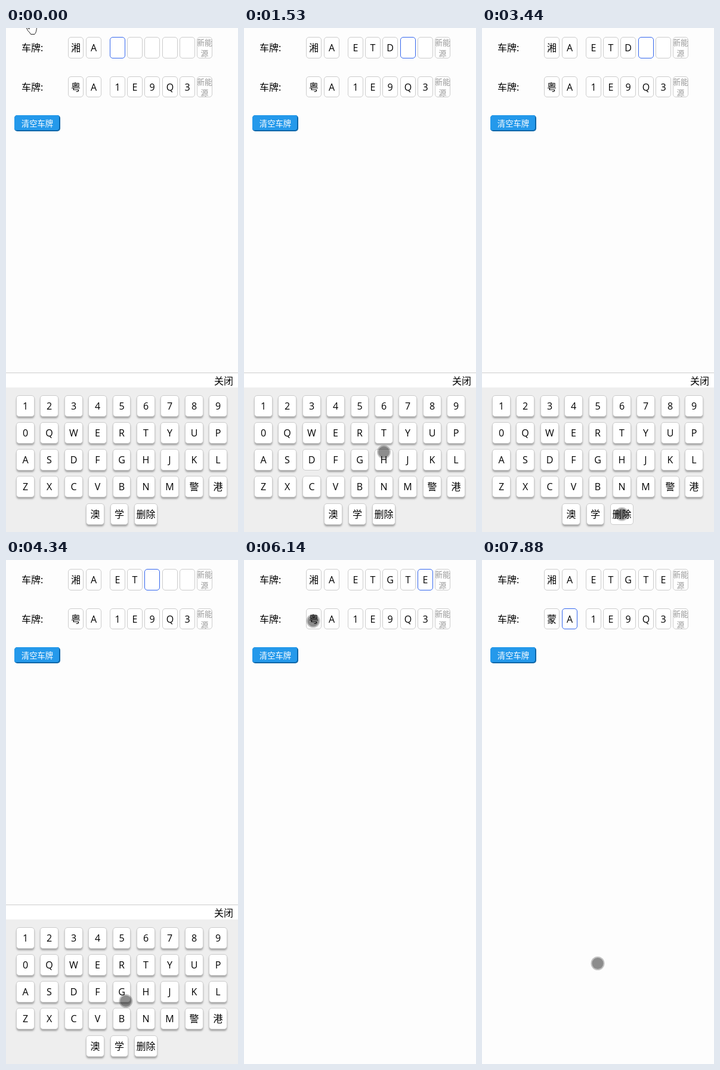
An HTML page with a canvas that plays this animation: 389x844 px, repeating every 8000 ms.

```html
<!DOCTYPE html>
<html lang="zh-CN">
<head>
<meta charset="utf-8">
<title>车牌键盘</title>
<style>
  html, body { margin: 0; width: 100%; height: 100%; overflow: hidden; background: #fdfdfd; }
  canvas { display: block; width: 389px; height: 844px; }
</style>
</head>
<body>
<canvas></canvas>
<script>
const W = 389, H = 844, LOOP = 8000;
const FONT = '"Open Sans", "Noto Sans CJK SC", "Noto Sans CJK", sans-serif';
const TRAVEL = 720, PRESS = 135, OPEN_DELAY = 210, SLIDE = 135;
const ROW_Y = [15, 81], LAST_CELL = 6;

const canvas = document.querySelector('canvas');
const ctx = canvas.getContext('2d');
const ratio = window.devicePixelRatio || 1;
canvas.width = W * ratio;
canvas.height = H * ratio;

const cellX = i => Math.round(i < 2 ? 104 + 30 * i : 174 + 29.2 * (i - 2));

// Lays out rows of keys; the last row has its own left edge.
function makeBoard(top, step, h, lastLeft, rows) {
  const keys = rows.flatMap((row, r) => row.split(' ').map((label, i) => {
    const left = (r === rows.length - 1 ? lastLeft : 17) + 40.4 * i;
    const x = Math.round(left);
    const w = Math.round(left + (label.length > 1 ? 39 : 30.8)) - x;
    return { label, x, y: Math.round(top + 38 + step * r), w, h };
  }));
  return { top, keys };
}
const LETTERS = makeBoard(577, 45.15, 36, 134.2, [
  '1 2 3 4 5 6 7 8 9', '0 Q W E R T Y U P', 'A S D F G H J K L', 'Z X C V B N M 警 港', '澳 学 删除'
]);
const PROVINCES = makeBoard(609, 48.4, 39, 118, [
  '京 津 沪 渝 蒙 新 藏 宁 桂', '黑 吉 辽 晋 冀 青 鲁 豫 苏', '皖 浙 闽 赣 湘 鄂 粤 琼 甘', '陕 贵 云 川'
]);

// The pointer reaches each stop at `arrive` and presses it at `tap`.
const STOPS = [
  { key: 'E', arrive: 720, tap: 900 },
  { key: 'T', arrive: 1080, tap: 1170 },
  { key: 'D', arrive: 1350, tap: 1440 },
  { key: 'H', arrive: 1530, tap: 1710, dy: -13 },
  { key: '港', arrive: 2340, dy: 20 },
  { key: '删除', arrive: 3150, tap: 3350 },
  { key: '删除', arrive: 3900, tap: 3980 },
  { key: 'G', arrive: 4560, tap: 4610 },
  { key: 'T', arrive: 4880, tap: 4970 },
  { key: 'E', arrive: 5060, tap: 5240, dy: -21 },
  { cell: 0, arrive: 6100, tap: 6430 },
  { key: '蒙', arrive: 7500, tap: 7610, dy: 9 }
];

function stopPoint({ key, cell, dy = 0 }) {
  if (!key) return [cellX(cell) + 12, ROW_Y[1] + 21];
  const k = [...LETTERS.keys, ...PROVINCES.keys].find(k => k.label === key);
  return [k.x + k.w / 2, k.y + k.h / 2 + dy];
}

// Replays every tap up to time t.
function stateAt(t) {
  const s = { plates: [[...'湘A'], [...'粤A1E9Q3']], row: 0, focus: 2, board: LETTERS, opened: -LOOP };
  for (const { key, tap } of STOPS) {
    if (!(tap <= t)) continue;
    const plate = s.plates[s.row];
    if (!key) {
      Object.assign(s, { row: 1, focus: 0, board: PROVINCES, opened: tap + OPEN_DELAY });
    } else if (key === '删除') {
      plate[--s.focus] = '';
    } else {
      plate[s.focus] = key;
      if (s.focus === LAST_CELL || s.board === PROVINCES) s.board = null;
      s.focus = Math.min(s.focus + 1, LAST_CELL);
    }
  }
  return s;
}

function pointerAt(t) {
  let from = [42, 0], free = 0;
  for (const stop of STOPS) {
    const to = stopPoint(stop);
    const leave = Math.max(free, stop.arrive - TRAVEL);
    if (t < leave) return from;
    if (t < stop.arrive) {
      const k = Math.sin((t - leave) / (stop.arrive - leave) * Math.PI / 2);
      return from.map((v, i) => v + (to[i] - v) * k);
    }
    from = to;
    free = stop.tap || stop.arrive;
  }
  return from;
}

function text(str, x, y, size = 16, color = '#000', align = 'center') {
  ctx.font = `${size}px ${FONT}`;
  ctx.fillStyle = color;
  ctx.textAlign = align;
  ctx.fillText(str, x, Math.round(y + size * 0.375));
}

function box(x, y, w, h, stroke) {
  ctx.beginPath();
  ctx.roundRect(x + 0.5, y + 0.5, w - 1, h - 1, 4.5);
  ctx.fillStyle = '#fff';
  ctx.fill();
  ctx.shadowColor = 'transparent';
  ctx.strokeStyle = stroke;
  ctx.lineWidth = 1;
  ctx.stroke();
}

function drawPlate(plate, row, focus) {
  const y = ROW_Y[row];
  text('车牌:', 26, y + 18, 16, '#000', 'left');
  for (let i = 0; i < 8; i++) {
    const x = cellX(i);
    box(x, y, 26, 36 - row, i === focus ? '#36e' : '#ccc');
    if (plate[i]) text(plate[i], x + 13, y + 18);
  }
  text('新能', 333, y + 9.5, 12.8, '#999');
  text('源', 333, y + 27, 12.8, '#999');
}

function drawButton() {
  ctx.save();
  ctx.beginPath();
  ctx.roundRect(14, 146, 77, 27, 5);
  ctx.clip();
  ctx.fillStyle = '#0e66a8';
  ctx.fillRect(14, 146, 77, 27);
  ctx.beginPath();
  ctx.roundRect(10, 142, 79, 29, 4);
  ctx.fillStyle = '#2499eb';
  ctx.fill();
  ctx.restore();
  text('清空车牌', 52.5, 160, 13.33, '#fff');
}

function drawKeyboard({ top, keys }, t, opened) {
  const slide = Math.min(1, (t - opened) / SLIDE);
  ctx.save();
  ctx.translate(0, Math.round((H - top) * (1 - slide)));
  ctx.fillStyle = '#fff';
  ctx.fillRect(0, top, W, 25);
  ctx.fillStyle = '#ccc';
  ctx.fillRect(0, top, W, 1);
  ctx.fillStyle = '#eee';
  ctx.fillRect(0, top + 25, W, H - top - 25);
  text('关闭', 365, top + 14);
  for (const { label, x, y, w, h } of keys) {
    const pressed = STOPS.some(s => s.key === label && t >= s.tap && t < s.tap + PRESS);
    if (!pressed) {
      ctx.shadowColor = '#a0a0a0';
      ctx.shadowBlur = 3 * ratio;
      ctx.shadowOffsetY = 3 * ratio;
    }
    box(x, y, w, h, '#ccc');
    text(label, x + w / 2, y + Math.floor(h / 2));
  }
  ctx.restore();
}

function drawHand() {
  ctx.beginPath();
  ctx.moveTo(39, -3);
  ctx.lineTo(39, 2);
  ctx.quadraticCurveTo(36, -2, 34.5, 0);
  ctx.quadraticCurveTo(36, 5, 40, 8);
  ctx.lineTo(41.5, 10.5);
  ctx.lineTo(48, 10.5);
  ctx.quadraticCurveTo(51.5, 7, 51.5, -3);
  ctx.fillStyle = '#fff';
  ctx.fill();
  ctx.strokeStyle = '#222';
  ctx.stroke();
}

function drawTouch(x, y) {
  for (const [radius, alpha] of [[11.5, 0.23], [9.5, 0.28]]) {
    ctx.beginPath();
    ctx.arc(x, y, radius, 0, 2 * Math.PI);
    ctx.fillStyle = `rgba(0,0,0,${alpha})`;
    ctx.fill();
  }
}

function draw(t) {
  ctx.setTransform(ratio, 0, 0, ratio, 0, 0);
  ctx.fillStyle = '#fdfdfd';
  ctx.fillRect(0, 0, W, H);
  const { plates, row, focus, board, opened } = stateAt(t);
  plates.forEach((plate, r) => drawPlate(plate, r, r === row ? focus : -1));
  drawButton();
  if (board && t >= opened) drawKeyboard(board, t, opened);
  if (t < 90) drawHand();
  else drawTouch(...pointerAt(t));
}

function tick() {
  draw(performance.now() % LOOP);
  requestAnimationFrame(tick);
}
tick();
</script>
</body>
</html>
```
